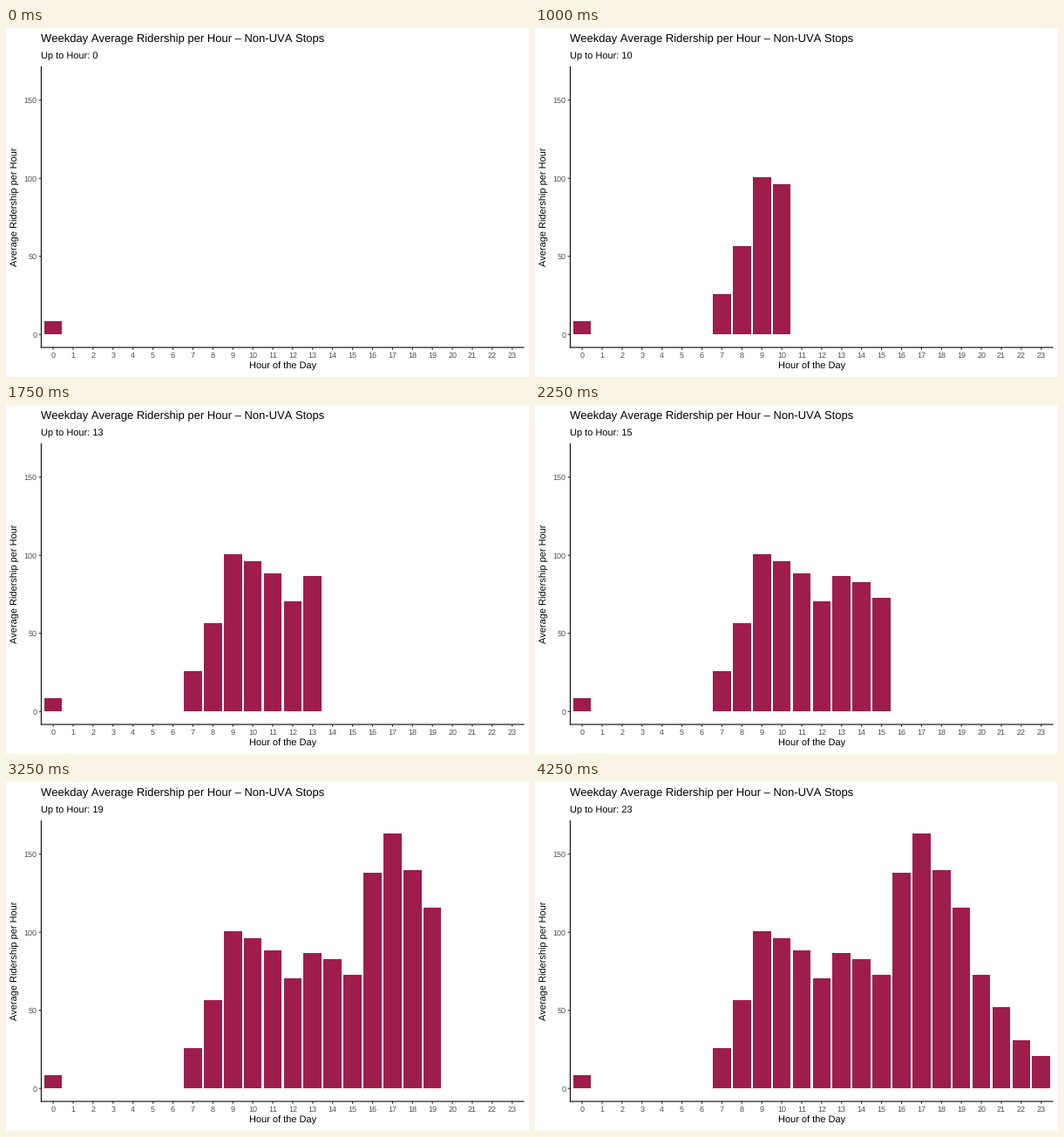
Write a matplotlib script that moves like this. It is 600 px wide and 400 px high and loops after 4500 ms.

```python
import matplotlib.pyplot as plt
from matplotlib.animation import FuncAnimation
from matplotlib.patches import Rectangle

WIDTH, HEIGHT, DPI = 600, 400, 100
PT = 72 / DPI  # points per pixel

# Unhinted, unkerned text
plt.rcParams["font.family"] = "Liberation Sans"
plt.rcParams["text.hinting"] = "none"
plt.rcParams["text.hinting_factor"] = 1
plt.rcParams["text.kerning_factor"] = 6

# Panel edges in pixels, y pointing down
LEFT, RIGHT, TOP, BOTTOM = 40.4, 594.5, 43.9, 366.1
STEP = (RIGHT - LEFT) / 24.2
ZERO_Y = 351.2
UNIT = 1.79

RIDERSHIP = {
    0: 8.5, 7: 25.8, 8: 56.5, 9: 100.7, 10: 96.2, 11: 88.4,
    12: 70.5, 13: 86.7, 14: 82.8, 15: 72.7, 16: 138.1, 17: 163.3,
    18: 139.8, 19: 115.8, 20: 72.7, 21: 52.1, 22: 30.8, 23: 20.7,
}
HOURS = list(RIDERSHIP)


def hour_x(hour):
    return LEFT + (hour + 0.6) * STEP


def value_y(value):
    return ZERO_Y - value * UNIT


fig = plt.figure(figsize=(WIDTH / DPI, HEIGHT / DPI), dpi=DPI, facecolor="white")
ax = fig.add_axes([0, 0, 1, 1])
ax.set_xlim(0, WIDTH)
ax.set_ylim(HEIGHT, 0)
ax.axis("off")


def label(x, y, text, size, color="black", **kwargs):
    kwargs.setdefault("va", "baseline")
    return ax.text(x, y, text, fontsize=size * PT, color=color, **kwargs)


def line(xs, ys, color):
    ax.plot(xs, ys, color=color, lw=1.07 * PT, snap=False,
            solid_capstyle="butt", zorder=3)


def make_bar(hour):
    # Edges sit on whole pixels
    x0 = round(hour_x(hour) - 0.45 * STEP)
    x1 = round(hour_x(hour) + 0.45 * STEP)
    top, base = round(value_y(RIDERSHIP[hour])), round(ZERO_Y)
    bar = Rectangle((x0, top), x1 - x0, base - top,
                    facecolor="#9E1D4D", lw=0, visible=False)
    return ax.add_patch(bar)


for value in (0, 50, 100, 150):
    y = value_y(value)
    line([LEFT - 2.75, LEFT], [y, y], "#333333")
    label(35.2, y + 3.4, str(value), 8.8, "#4D4D4D", ha="right")

for hour in range(24):
    x = hour_x(hour)
    line([x, x], [BOTTOM, BOTTOM + 2.75], "#333333")
    label(x, 378, str(hour), 8.8, "#4D4D4D", ha="center")

line([LEFT, LEFT], [TOP, BOTTOM + 0.5], "black")
line([LEFT - 0.5, RIGHT], [BOTTOM, BOTTOM], "black")

label(LEFT, 16, "Weekday Average Ridership per Hour – Non-UVA Stops", 13.2)
subtitle = label(LEFT, 35, "", 11)
label((LEFT + RIGHT) / 2, 390.6, "Hour of the Day", 11, ha="center")
label(13.8, (TOP + BOTTOM) / 2, "Average Ridership per Hour", 11,
      rotation=90, rotation_mode="anchor", ha="center")

bars = [make_bar(hour) for hour in HOURS]


def update(frame):
    subtitle.set_text(f"Up to Hour: {HOURS[frame]}")
    for i, bar in enumerate(bars):
        bar.set_visible(i <= frame)
    return [subtitle, *bars]


anim = FuncAnimation(fig, update, frames=len(HOURS), interval=250,
                     repeat=True, repeat_delay=0)
plt.show()
```
